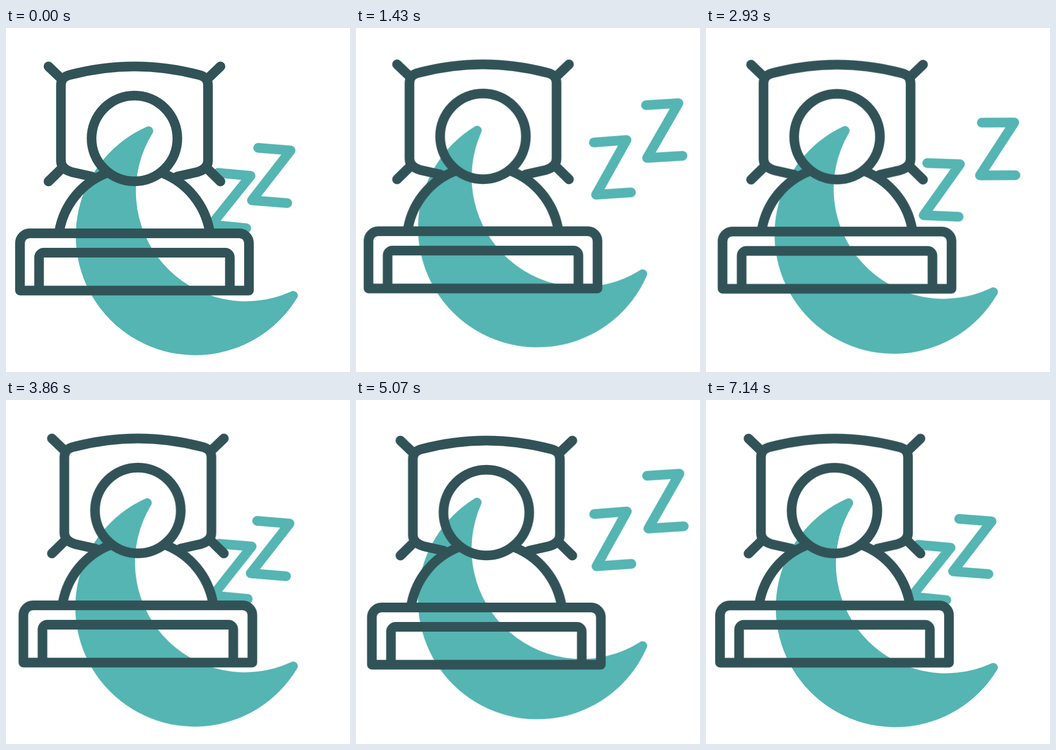
Animation, 640 px wide and 640 px high, one loop 7210 ms. Source, as an HTML page without scripts:

```html
<!DOCTYPE html>
<html lang="en">
<head>
<meta charset="utf-8">
<title>Sleeping</title>
<style>
  html, body { margin: 0; width: 100%; height: 100%; overflow: hidden; background: #fff; }
  svg { display: block; width: 100vw; height: 100vh; }

  .line { fill: none; stroke-width: 17.9; stroke-linecap: round; stroke-linejoin: round; }
  .bed { stroke: #315357; }
  .zed { stroke: #54b5b3; }
  .moon { fill: #54b5b3; }

  /* The moon and both letters swing around distant pivots, twice per loop */
  .moon { transform-origin: 237.5px 485.5px; animation: rock 3605ms infinite; }
  .low { transform-origin: 79px -49px; animation: swing-low 3605ms infinite; }
  .high { transform-origin: -65px -321px; animation: swing-high 3605ms -3407ms infinite; }

  @keyframes rock {
    0%, 100% { transform: rotate(0deg); animation-timing-function: cubic-bezier(.38, 0, .45, 1); }
    45% { transform: rotate(-7.9deg); animation-timing-function: cubic-bezier(.4, 0, .45, 1); }
  }
  @keyframes swing-low {
    0%, 100% { transform: rotate(0deg); animation-timing-function: cubic-bezier(.45, 0, .5, 1); }
    50% { transform: rotate(-10.2deg); animation-timing-function: cubic-bezier(.48, 0, .58, 1); }
  }
  @keyframes swing-high {
    0%, 100% { transform: rotate(0deg); animation-timing-function: cubic-bezier(.5, 0, .5, 1); }
    50% { transform: rotate(-10deg); animation-timing-function: cubic-bezier(.5, 0, .55, 1); }
  }

  /* The bed drifts a few pixels, each axis on its own */
  .drift-x { animation: drift-x 7210ms linear infinite; }
  .drift-y { animation: drift-y 7210ms infinite; }

  @keyframes drift-x {
    0%, 100% { transform: translateX(0); }
    13% { transform: translateX(-1px); }
    21% { transform: translateX(-3px); }
    28.7% { transform: translateX(.3px); }
    44% { transform: translateX(6px); }
    51% { transform: translateX(6.8px); }
    70% { transform: translateX(3.6px); }
    85% { transform: translateX(.6px); }
  }
  @keyframes drift-y {
    0%, 53.5% { transform: translateY(0); animation-timing-function: cubic-bezier(.39, .575, .565, 1); }
    24% { transform: translateY(-4px); }
    33% { transform: translateY(-4px); animation-timing-function: cubic-bezier(.47, 0, .745, .715); }
    73% { transform: translateY(4px); }
    80% { transform: translateY(4px); animation-timing-function: cubic-bezier(.47, 0, .745, .715); }
    100% { transform: translateY(0); }
  }
</style>
</head>
<body>
<svg viewBox="0 0 640 640">
  <path class="moon" d="M262 183.700A222 222 0 1 0 540.5 503.700A8.5 8.5 0 0 0 530 490.5A204.5 204.5 0 0 1 272.5 196A8.5 8.5 0 0 0 262 183.700Z"/>
  <path class="line zed low" d="M394 269.5L455 275L382 366L447 372.5"/>
  <path class="line zed high" d="M467 225L527.5 230L455 322.5L521 328"/>

  <g class="drift-x">
    <g class="drift-y line bed">
      <!-- pillow -->
      <path d="M160 276.5L122 268Q102.200 262 102.200 247V106Q102.200 91 120 87Q239 56 358 87Q375.800 91 375.800 106V247Q375.800 262 356 268L318 276.5"/>
      <path d="M79 71.5L102 93.5M399 71.5L376 93.5M79 285.5L102 263M399 285.5L376 263"/>
      <!-- sleeper -->
      <circle cx="239" cy="205.5" r="79.8"/>
      <path d="M99.5 376A142 142 0 0 1 187 270M378.5 376A142 142 0 0 0 291 270"/>
      <!-- blanket -->
      <path d="M26 488.5V400a18 18 0 0 1 18-18H434a18 18 0 0 1 18 18V488.5Z"/>
      <path d="M61.5 488V427a9 9 0 0 1 9-9H407.5a9 9 0 0 1 9 9V488"/>
    </g>
  </g>
</svg>
</body>
</html>
```
